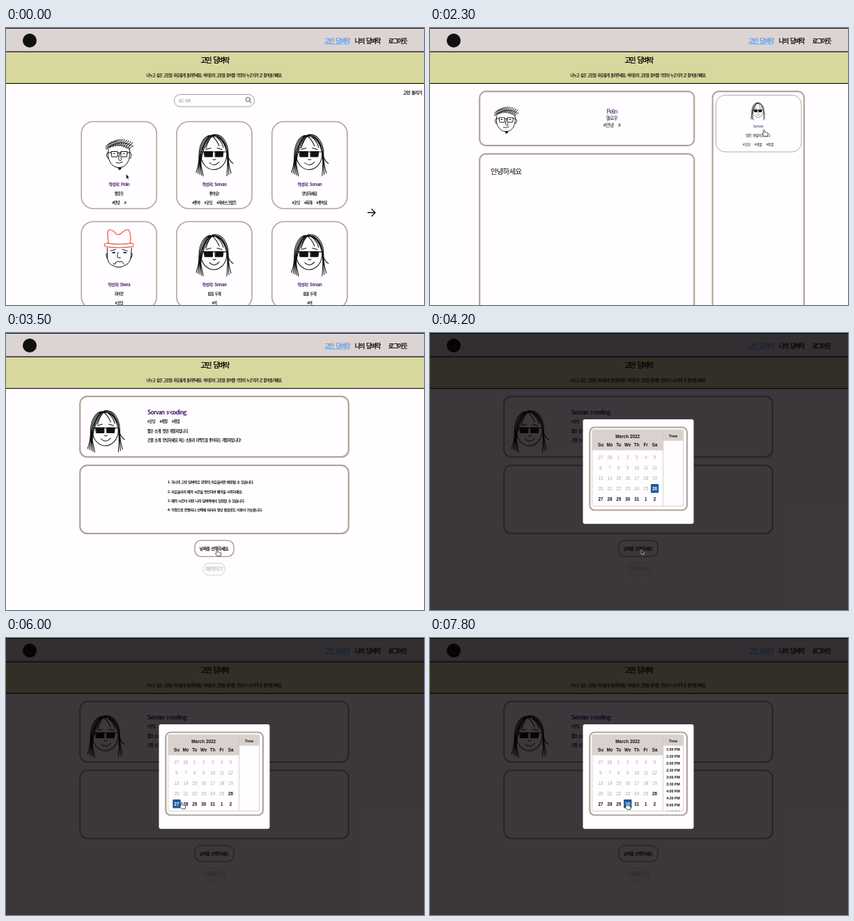
An HTML page for the animation above (8000 ms loop, 600 by 398 pixels).

```html
<!DOCTYPE html>
<html lang="ko">
<head>
<meta charset="utf-8">
<style>
html, body { margin: 0; width: 100%; height: 100%; overflow: hidden; background: #fffdff; }
svg { display: block; width: 100%; height: 100%; }
text { font-family: "Noto Sans CJK KR", "Noto Sans", sans-serif; letter-spacing: -.09em; word-spacing: .12em; }
.title { font-weight: 900; letter-spacing: -.17em; word-spacing: .25em; }
.hand { font-weight: 400; }
.med, .bold { font-weight: 700; }
.cal { font-family: "Liberation Sans", Arial, sans-serif; letter-spacing: 0; word-spacing: 0; }
.line { fill: none; stroke: #111; stroke-linecap: round; stroke-linejoin: round; }
.solid { fill: #111; }
.hat { stroke: #f0624a; }
</style>
</head>
<body>
<svg id="stage" viewBox="0 0 600 398"></svg>
<script>
const LOOP = 8000, STEP = 100;
const BROWN = '#b3a39a', PURPLE = '#46206a', INK = '#111', SHADE = '#d9d1cd';
const range = n => [...Array(n).keys()];

const text = (x, y, str, size, { fill = INK, cls = 'med', anchor = 'middle' } = {}) =>
  `<text x="${x}" y="${y}" font-size="${size}" fill="${fill}" class="${cls}" text-anchor="${anchor}">${str}</text>`;
const box = (x, y, w, h, r, stroke, sw, fill = 'none') =>
  `<rect x="${x}" y="${y}" width="${w}" height="${h}" rx="${r}" fill="${fill}" stroke="${stroke}" stroke-width="${sw}"/>`;
const fillBox = (x, y, w, h, fill, r = 0) => box(x, y, w, h, r, 'none', 0, fill);
const path = (d, sw = 1, cls = '') => `<path class="line ${cls}" d="${d}" stroke-width="${sw}"/>`;
const at = (x, y, s, body) => `<g transform="translate(${x} ${y}) scale(${s})">${body}</g>`;
const tags = (...names) => names.map(n => '#' + n).join('\u2003 ');

// Portraits, each drawn around its own centre
function longHair() {
  const left = range(5).map(i =>
    `M-3 -29C${-15 + i * 2} ${-31 + i * 1.5} ${-22 + i * 2} -15 ${-22 + i * 1.1} 0S${-24 + i * 1.6} 16 ${-26 + i * 2.5} ${24 + i * 1.3}`);
  const right = range(3).map(i =>
    `M-3 ${-30 + i}C${13 - i * 2} ${-33 + i * 2} ${20 - i * 2} -16 ${20 - i} -3S${21 - i} 16 ${24 - i * 3} ${25 + i * 2}`);
  const fringe = 'M-3 -29C-9 -27 -14 -18 -17 -9M-3 -28C-8 -24 -10 -18 -12 -11' +
    'M-3 -28C1 -25 5 -19 7 -14M-3 -29C5 -28 11 -20 13 -12M-2 -30C9 -28 15 -20 17 -8';
  return path(left.join('') + right.join('') + fringe, 1.05) +
    path('M-19 -3C-20 11 -10 20 -1 20S18 12 18 -3M-7 10Q0 17 7 9M-2 5Q0 7 2 5M-12 -9L-5 -11M4 -11L11 -9M20 2Q23 9 27 11', 1.05) +
    path('M-19 -5.5H18', 1.2) +
    path('M-14.5 -6H-2.5V1.5H-13.5ZM1.5 -6H13L12 1.5H1.5Z', 1, 'solid');
}
function shortHair() {
  const tufts = range(13).map(i => {
    const x = -17 + i * 2.7, y = -17 - 5 * Math.sin(i / 12 * Math.PI);
    return `M${x - 1} ${y + 8}Q${x - 3} ${y + 3} ${x + 1} ${y + 1}T${x + 4} ${y - 2}M${x} ${y + 7}Q${x + 1} ${y + 3} ${x + 5} ${y + 3}`;
  }).join('');
  return path(tufts, 1) +
    path('M-15 -9C-18 3 -12 17 0 17S17 4 15 -9M-16 -4Q-20 -3 -16 4M16 -4Q20 -3 16 4') +
    path('M-11 -6H-2V1.5H-10ZM3 -6H12L11 1.5H3ZM-2 -4H3M-16 -5L-11 -4M12 -4L16 -5M1 -3Q-2 6 1 7T3 3M-4 10Q0 12 5 9') +
    path('M-8 -3H-6M6 -3H8', 1.2) + path('M-1 17.5L1 20L3 17.5Z', 1.4, 'solid');
}
function hatted() {
  return path('M-17 -11C-16 -4 -19 9 -11 13Q0 20 10 13C19 9 17 -4 18 -11M-17 -4Q-20 -3 -17 4M18 -4Q21 -3 17 4' +
      'M-12 -7L-5 -9M5 -9L12 -7M-1 -5Q-4 2 -1 3H2M-6 11L-2 8L1 9L4 8L7 12M-8 11Q-6 14 -5 11') +
    path('M-9 -4.5H-6M7 -4.5H10', 1.7) +
    path('M-15 -18C-16 -26 -18 -36 -14 -37Q-9 -38 -4 -31Q0 -29 4 -33Q11 -39 14 -37Q18 -30 16 -18M-17 -18Q0 -15 18 -18Q22 -17 20 -13Q0 -10 -20 -13Q-23 -17 -17 -18', 1.3, 'hat');
}

const header =
  fillBox(0, 0, 600, 34, '#dcd4d2') + fillBox(0, 34, 600, 45, '#d8d89e') +
  fillBox(0, 0, 600, 1, INK) + fillBox(0, 33.5, 600, 1.3, INK) + fillBox(0, 79, 600, 1.2, INK) +
  '<circle cx="34" cy="18" r="10" fill="#111"/>' +
  text(475, 21.7, '고민 담벼락', 8.8, { fill: '#62a0f2', cls: 'title' }) + fillBox(458, 22.6, 33.5, .8, '#62a0f2') +
  text(518.8, 21.7, '나의 담벼락', 8.8, { cls: 'title' }) +
  text(562, 21.7, '로그아웃', 8.8, { cls: 'title' }) +
  text(299.5, 50, '고민 담벼락', 9.9, { cls: 'title' }) +
  text(299, 70, '나누고 싶은 고민을 자유롭게 올려주세요. 여러분의 고민을 들어줄 익명의 누군가가 곧 찾아올거에요.', 5.15);

function card(col, row, face, name, title, tagLine) {
  const cx = 162.2 + col * 136.8, y = 134.5 + row * 143.7;
  return box(cx - 54, y, 108, 125, 17, '#aea49c', 1.6) +
    at(cx, y + 49, 1, face) +
    text(cx, y + 92.3, '작성자: ' + name, 5.8, { fill: PURPLE }) +
    text(cx, y + 105.7, title, 5.2) + text(cx, y + 118.8, tagLine, 5.2);
}
const list =
  box(241.5, 95.5, 115, 17.5, 8.7, '#a39f9c', 1) +
  text(248, 105.6, '태그 검색', 4.6, { fill: '#777', cls: '', anchor: 'start' }) +
  '<circle cx="347.3" cy="102.8" r="3.1" class="line" stroke-width=".7"/>' + path('M349.6 105.1L352 107.5', .8) +
  text(583.5, 95.3, '고민 올리기', 6.1) +
  card(0, 0, shortHair(), 'Pelin', '헬로우', tags('안녕', '')) +
  card(1, 0, longHair(), 'Sorvan', '좋아요!', tags('좋아', '코딩', '자바스크립트')) +
  card(2, 0, longHair(), 'Sorvan', '안녕하세요', tags('코딩', '화해', '좋아요')) +
  card(0, 1, hatted(), 'Dovra', '하이루', tags('코딩')) +
  card(1, 1, longHair(), 'Sorvan', '쉼표 두개', tags('어')) +
  card(2, 1, longHair(), 'Sorvan', '쉼표 두개', tags('어')) +
  path('M519.5 265.3H530M525 260.3L530 265.3L525 270.3', 1.4);

const detail =
  box(71.2, 91.2, 308, 77.6, 9, BROWN, 2.2) + box(71.2, 180.8, 308, 240, 9, BROWN, 2.2) +
  box(405.6, 91.2, 131.4, 330, 9, BROWN, 2.2) + box(410.5, 96.5, 122.5, 81.5, 13, '#a9a29e', .9) +
  at(109, 134, .87, shortHair()) +
  text(261, 123, 'Pelin', 8.4, { fill: PURPLE, cls: 'hand' }) +
  text(261, 132.3, '헬로우', 6.6, { cls: 'hand' }) +
  text(261, 142.3, '#안녕\u2003#', 7, { cls: 'hand' }) +
  text(87, 210, '안녕하세요', 10.6, { cls: 'hand', anchor: 'start' }) +
  at(471, 120, .42, longHair()) +
  text(471, 143, 'Sorvan', 5.2, { fill: PURPLE, cls: 'hand' }) +
  text(471, 155.6, '멋진 개발자입니다.', 5, { cls: 'hand' }) +
  text(471, 168.6, tags('코딩', '개발', '취업'), 5, { cls: 'hand' });

const rules = [
  '하나의 고민 담벼락은 한명의 카운슬러만 배정될 수 있습니다.',
  '카운슬러의 예약 시간을 확인하여 예약을 시작하세요.',
  '예약 시간이 되면 나의 담벼락에서 입장할 수 있습니다.',
  '익명으로 진행되나 선택에 따라서 영상 통화로도 이용이 가능합니다.'
];
const start = { anchor: 'start' };
const profile =
  box(106.2, 91.2, 385.6, 87, 10.5, BROWN, 2.2) + box(106.2, 190.2, 385.6, 98, 10.5, BROWN, 2.2) +
  at(143.3, 142, 1, longHair()) +
  text(203, 116.5, 'Sorvan s-coding', 8.3, { fill: PURPLE, anchor: 'start' }) +
  text(203, 129.3, tags('코딩', '개발', '취업'), 5.2, start) +
  text(203, 142.6, '짧은 소개: 멋진 개발자입니다.', 5.2, start) +
  text(203, 155.7, '긴줄 소개: 안녕하세요 저는 소통과 리액트를 좋아하는 개발자입니다!', 5.2, start) +
  rules.map((r, i) => text(232, 216.3 + i * 13.3, `${i + 1}. ${r}`, 5.1, start)).join('') +
  box(271, 298, 56, 23.3, 9, BROWN, 1.6) + text(299, 311.8, '날짜를 선택하세요.', 5.9) +
  box(283, 331, 31.5, 17, 8, '#d2d0d2', 1) + text(299, 342, '예약하기', 7.6, { fill: '#aaa8aa', cls: '' });

function spinner(angle) {
  return `<g transform="translate(298.7 100) scale(1 1.17) rotate(${angle})" fill="none" stroke-width="4.6">
    <circle r="14.8" stroke="#f1f0f2"/><path d="M-10.5 -10.5A14.8 14.8 0 0 1 10.5 -10.5" stroke="#dad9db"/></g>`;
}

// Half-hour slots, counted from the given afternoon hour
const slot = (hour, i) => `${hour + (i >> 1)}:${i % 2 ? '30' : '00'} PM`;
function calendar(selected, hour, count) {
  const cal = (x, y, s, size, fill = INK, bold = true) => text(x, y, s, size, { fill, cls: bold ? 'cal bold' : 'cal' });
  const colX = c => 245 + c * 12.93;
  const days = range(35).map(i => {
    const day = i < 2 ? 27 + i : i < 33 ? i - 1 : i - 32;
    const x = colX(i % 7), y = 178.7 + Math.floor(i / 7) * 14.9, on = i === selected;
    return (on ? fillBox(x - 5.7, y - 6.3, 11.4, 12.6, '#1e5b9c', 1) : '') +
      cal(x, y + 2.2, day, 6.3, on ? '#fff' : i < 27 ? '#aaa' : INK, i >= 27);
  }).join('');
  return fillBox(0, 0, 600, 398, 'rgba(5,0,4,.78)') +
    fillBox(219.5, 124, 159, 150.3, '#fffdff', 3) +
    box(229.3, 135.5, 139.6, 119, 7, BROWN, 2.2) +
    box(232.8, 139, 131, 109.7, 2, '#b9b4b2', .6, '#fffdff') +
    fillBox(233, 139.2, 101.5, 29.3, SHADE) + fillBox(335, 139.2, 28.6, 15.6, SHADE) +
    fillBox(334.4, 139, .6, 109.5, '#b9b4b2') +
    cal(283.7, 151.4, 'March 2022', 6.4) + cal(349, 150.3, 'Time', 5.4) +
    '<path d="M326.4 147.8L327.6 149L326.4 150.2" fill="none" stroke="#aaa" stroke-width=".6"/>' +
    ['Su', 'Mo', 'Tu', 'We', 'Th', 'Fr', 'Sa'].map((d, c) => cal(colX(c), 163, d, 6.3)).join('') +
    days +
    `<g clip-path="url(#slots)">${range(count).map(i => cal(349, 161.5 + i * 10, slot(hour, i), 5.2)).join('')}</g>`;
}

// Pointer positions: time, x, y
const moves = [
  [0, 172.3, 209.7], [100, 172.3, 209.7], [400, 173, 210.5], [1500, 173, 210.5], [1600, 372, 198], [1700, 470, 187],
  [1800, 470, 187], [2300, 479.5, 146], [2600, 479.5, 146], [3100, 303, 324], [3300, 303, 324], [3400, 303, 315],
  [3500, 303, 311], [4200, 303, 311], [5000, 250, 241], [5300, 246, 236], [5700, 246, 236], [6000, 252, 236],
  [6200, 256, 236], [6500, 256, 236], [7400, 282.5, 237], [LOOP, 282.5, 237]
];
function pointerAt(t) {
  const k = Math.max(1, moves.findIndex(m => m[0] >= t));
  const [t0, x0, y0] = moves[k - 1], [t1, x1, y1] = moves[k];
  const p = (t - t0) / (t1 - t0), long = t1 - t0 > 450;
  const e = long ? p * p * (3 - 2 * p) : p;
  return [x0 + (x1 - x0) * e, y0 + (y1 - y0) * e];
}
function cursor(t) {
  const onLink = t >= 1900 && t < 2600 || t >= 3400 && t < 4200 || t >= 5000;
  const shape = onLink
    ? '<path d="M-1 1Q0 -.6 1 1V4Q2 3.2 2.8 4.2Q4 3.6 4.4 4.7Q6 4.4 5.8 6L5 9.6H.5L-2.4 6.2Q-2.6 5 -1 5.6Z" fill="#fff" stroke="#222" stroke-width=".8"/>'
    : '<path d="M0 0V7.2L1.6 5.7L2.7 8.2L3.9 7.7L2.8 5.2H4.9Z" fill="#111" stroke="#fff" stroke-width=".5"/>';
  return at(...pointerAt(t), 1, shape);
}

function page(t) {
  if (t < 900) return list;
  if (t < 1100) return spinner((t - 900) * .36);
  if (t < 2500) return detail;
  if (t < 2600) return spinner(0);
  return profile;
}
function modal(t) {
  if (t < 4200) return '';
  if (t < 5500) return calendar(27, 0, 0);
  if (t < 6400) return calendar(28, 0, 0);
  if (t < 7700) return calendar(29, 6, 9);
  return calendar(31, 1, 10);
}

const stage = document.getElementById('stage');
const base = '<defs><clipPath id="slots"><rect x="335" y="155" width="28.6" height="93.4"/></clipPath></defs>' +
  fillBox(0, 0, 600, 398, '#fffdff');
let shown = -1;
function render(now) {
  const t = Math.floor(now % LOOP / STEP) * STEP;
  if (t !== shown) {
    stage.innerHTML = base + header + page(t) + modal(t) + cursor(t);
    shown = t;
  }
}
const origin = performance.now();
function tick() {
  render(performance.now() - origin);
  requestAnimationFrame(tick);
}
tick();
</script>
</body>
</html>
```
